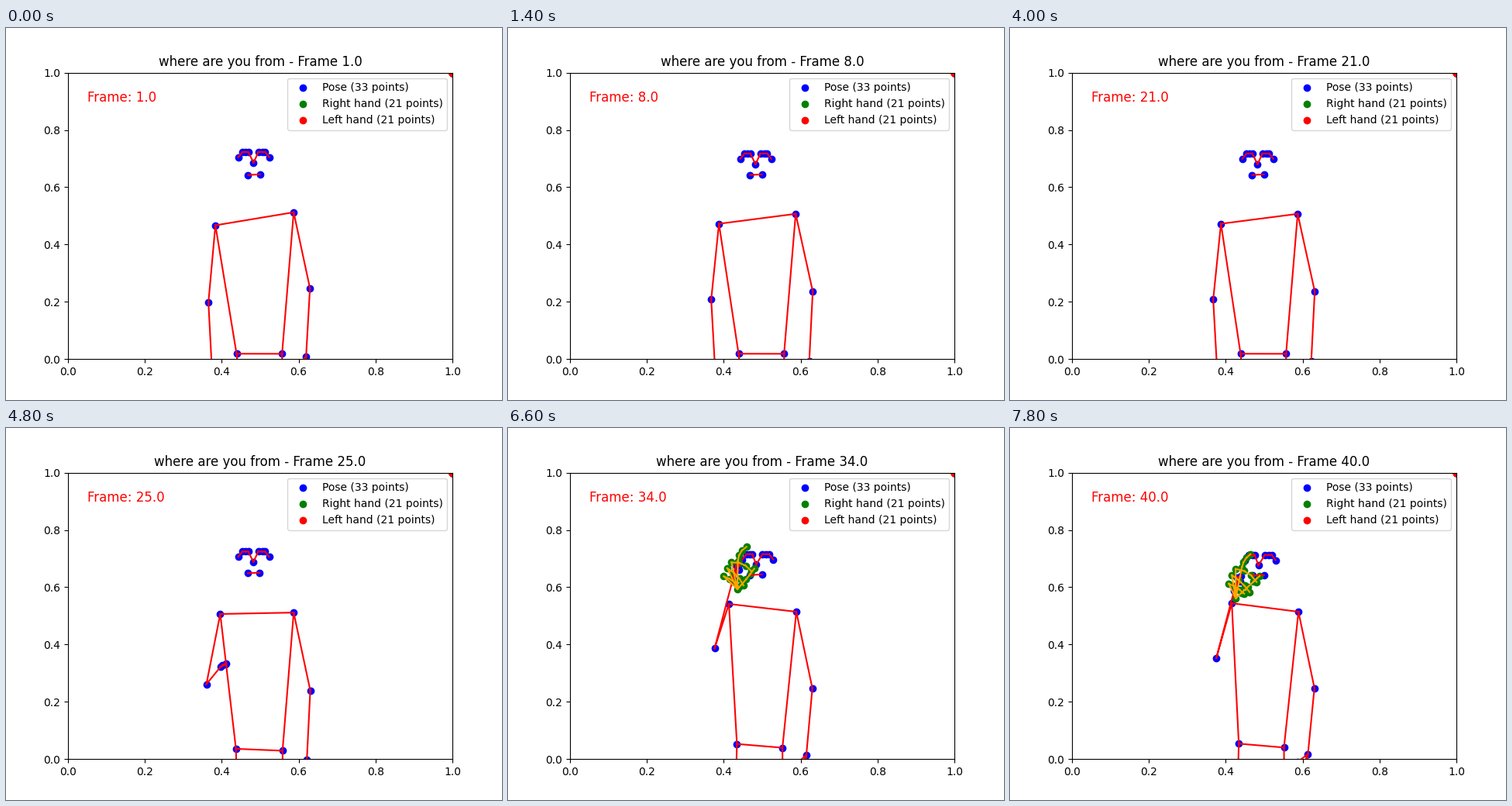
Animation of 640x480 px, one loop 8 s. Source, as a matplotlib script:

```python
import numpy as np
import matplotlib.pyplot as plt
from matplotlib.animation import FuncAnimation

FRAMES, INTERVAL = 40, 200
RAISE, HAND_START, HOLD = 20, 25, 28

# Each joint in stage pixels: arm down, arm raised, end of the wave.
POSES = {
    "eyes": [(319.5, 162.2), (319.2, 158), (322.6, 164)],
    "nose": [(319.2, 176), (319, 171), (320.3, 177.6)],
    "mouth": [(319.7, 189.5), (319.3, 185.8), (319.8, 190.3)],
    "l_shoulder": [(371, 240), (371, 237.3), (372, 237.3)],
    "l_elbow": [(393, 340), (392, 338), (392.6, 335.7)],
    "l_wrist": [(388.5, 430.3), (387.7, 426.3), (384.2, 421)],
    "l_index": [(383, 446), (383, 442), (371, 431)],
    "r_shoulder": [(272, 252.8), (279, 232), (286, 226.3)],
    "r_elbow": [(262, 350.5), (256, 318), (266, 297)],
    "r_wrist": [(267.5, 450), (283, 216), (289, 210)],
    "r_index": [(273, 475), (291, 193), (298, 191)],
    "r_hip": [(297.3, 420.5), (296, 410), (295, 407.5)],
    "l_hip": [(356, 420.6), (357, 414), (353.3, 412.5)],
}
POSES = {name: np.array(points) for name, points in POSES.items()}

# Starting displacement, which fades out as the body settles.
SETTLE = {
    "eyes": (0, -2), "nose": (0, -2),
    "l_shoulder": (0, -2), "l_elbow": (-1, -4),
    "l_wrist": (-1.5, -6.5), "l_index": (-6, -11),
    "r_shoulder": (-2, 2), "r_elbow": (-1, 3.5), "r_wrist": (-1.5, 0),
}

# Hand at the start and end of the wave: wrist, then for each finger
# the knuckle, the tip and how far it curls sideways.
WRISTS = np.array([(290, 220), (291, 220)])
FINGERS = np.array([
    [(290, 220, 313, 182, -.22), (301, 178, 313, 153, .58),
     (292, 179, 309, 159, .4), (284, 184, 295, 208, .46),
     (277, 192, 293, 209, .44)],
    [(291, 220, 322, 191, 0), (299, 180, 310, 163, .2),
     (291, 182, 318, 199, .25), (286, 190, 309, 212, .1),
     (282, 201, 302, 214, .1)],
])
HAND_LINKS = [link for base in range(1, 21, 4)
              for link in [(0, base)] + [(base + k, base + k + 1)
                                         for k in range(3)]]

BODY_LINKS = [("r_shoulder", "l_shoulder"), ("r_hip", "l_hip"),
              ("mouth_r", "mouth_l"), ("eye3", "nose"), ("nose", "eye4")]
BODY_LINKS += [(f"eye{i}", f"eye{i + 1}") for i in (0, 1, 2, 4, 5, 6)]
for side in "rl":
    BODY_LINKS += [(f"{side}_{a}", f"{side}_{b}") for a, b in [
        ("shoulder", "elbow"), ("elbow", "wrist"), ("shoulder", "hip"),
        ("hip", "knee"), ("wrist", "pinky"), ("wrist", "index"),
        ("wrist", "thumb"), ("pinky", "index")]]


def progress(t, start, end):
    return np.clip((t - start) / (end - start), 0, 1)


def smooth(u):
    return u * u * (3 - 2 * u)


def wave(t):
    """Eased progress of the wave and the lift of the arm within it."""
    u = progress(t, HOLD, FRAMES - 1)
    return 1 - (1 - u) ** 3, np.sin(np.pi * u)


def body(t):
    raised = smooth(progress(t, RAISE, HOLD - 1))
    late, lift = wave(t)
    unsettled = 1 - progress(t, 0, 7)
    p = {}
    for name, (rest, up, end) in POSES.items():
        p[name] = rest + raised * (up - rest) + late * (end - up)
        p[name] = p[name] + unsettled * np.array(SETTLE.get(name, (0, 0)))
    for name in ("r_elbow", "r_wrist", "r_index"):
        p[name] = p[name] + lift * np.array((2, -16))

    eyes, mouth = p.pop("eyes"), p.pop("mouth")
    for i, x in enumerate((-20, -14.5, -10.3, -7, 6, 11, 14.7, 20)):
        p[f"eye{i}"] = eyes + (x, 6.8 if i in (0, 7) else 0)
    p["mouth_r"] = mouth + (-7.5, .3)
    p["mouth_l"] = mouth + (7.7, -.4)
    p["l_pinky"] = p["l_wrist"] + (-6, 15)
    p["l_thumb"] = p["l_wrist"] + (-1, 13)
    p["r_pinky"] = p["r_index"] + (-5, 2)
    p["r_thumb"] = .4 * p["r_wrist"] + .6 * p["r_index"] + (2, 0)
    p["r_knee"] = p["r_hip"] + (12 - 15 * raised, 120)
    p["l_knee"] = p["l_hip"] + (1, 120)
    return p


def hand(t, pose_wrist):
    late, lift = wave(t)
    wrist = WRISTS[0] + late * (WRISTS[1] - WRISTS[0]) + lift * np.array((5, -12))
    points = [wrist]
    for i, row in enumerate(FINGERS[0] + late * (FINGERS[1] - FINGERS[0])):
        shift = lift * np.array((-3, -8))
        knuckle, tip, curl = row[:2] + shift, row[2:4] + shift, row[4]
        steps = np.linspace(0, 1, 4)
        if i == 0:
            knuckle, steps = wrist, np.linspace(.25, 1, 4)
        dx, dy = tip - knuckle
        bend = (knuckle + tip) / 2 + curl * np.array((dy, -dx))
        points += [(1 - s) ** 2 * knuckle + 2 * s * (1 - s) * bend + s * s * tip
                   for s in steps]
    if t < HOLD:
        points += pose_wrist - POSES["r_wrist"][1]
    return np.array(points)


def to_data(points):
    x, y = np.asarray(points, float).T
    return np.column_stack([(x + .2 - 80) / 496, (427.4 - y) / 369.6])


def set_links(line, points, links):
    gap = (np.nan, np.nan)
    path = np.array([q for a, b in links for q in (points[a], points[b], gap)])
    line.set_data(*to_data(path).T)


fig, ax = plt.subplots(figsize=(6.4, 4.8), dpi=100)
ax.set_xlim(0, 1)
ax.set_ylim(0, 1)
missing = np.ones((21, 2))  # an undetected hand collapses into the corner
pose_dots = ax.scatter([], [], c="blue", label="Pose (33 points)")
right_dots = ax.scatter([], [], c="green", label="Right hand (21 points)")
left_dots = ax.scatter(*missing.T, c="red", label="Left hand (21 points)")
bones, = ax.plot([], [], color="red")
fingers, = ax.plot([], [], color="orange")
ax.legend(loc="upper right")
title = ax.set_title("")
counter = ax.text(.05, .9, "", color="red", fontsize=12)


def update(t):
    joints = body(t)
    pose_dots.set_offsets(to_data(list(joints.values())))
    set_links(bones, joints, BODY_LINKS)
    if t >= HAND_START:
        shape = hand(t, joints["r_wrist"])
        right_dots.set_offsets(to_data(shape))
        set_links(fingers, shape, HAND_LINKS)
    else:
        right_dots.set_offsets(missing)
        fingers.set_data([], [])
    title.set_text(f"where are you from - Frame {t + 1:.1f}")
    counter.set_text(f"Frame: {t + 1:.1f}")
    return pose_dots, right_dots, bones, fingers, title, counter


anim = FuncAnimation(fig, update, frames=FRAMES, interval=INTERVAL,
                     repeat=True, repeat_delay=0, blit=False)
plt.show()
```
